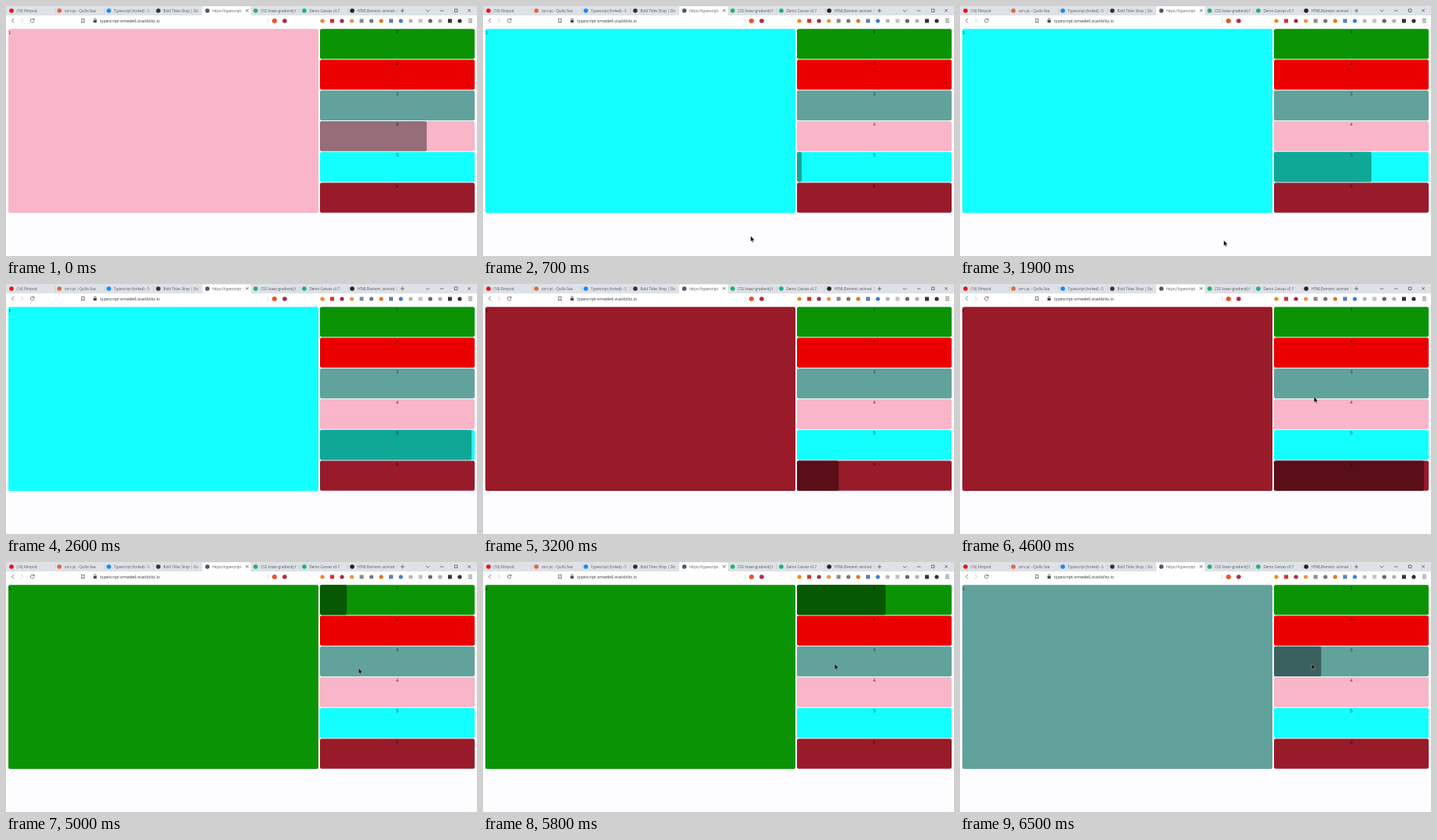
Animation of 600 by 319 pixels, one loop 6.6 s. Source, as an HTML page:

```html
<!DOCTYPE html>
<html lang="en">
<head>
<meta charset="utf-8">
<title>Carousel in a browser</title>
<style>
html, body { margin: 0; width: 100%; height: 100%; overflow: hidden; background: #fdfcfe; }
svg { display: block; width: 100%; height: 100%; }
text { font: 4.5px "Open Sans", "Noto Sans", sans-serif; fill: #55585c; }
.url { font-size: 5.2px; fill: #333; }
.num { font: 6.25px "Liberation Serif", serif; fill: #000; fill-opacity: .8; }
.line { fill: none; stroke: #444; stroke-width: .7; }
.thin { stroke: #b4b7bc; stroke-width: .5; }
</style>
</head>
<body>
<svg id="stage" viewBox="0 0 600 319">
  <rect width="600" height="12" fill="#dee1e6"/>
  <rect y="12" width="600" height="13" fill="#fff"/>
  <path d="M250 12V2q0-1.500 1.500-1.500h59q1.500 0 1.500 1.500V12Z" fill="#fff"/>
  <path class="thin" d="M63 3v6M126 3v6M188 3v6M374 3v6M436 3v6M498 3v6M334 16v6"/>
  <path class="line" d="M305.500 4l3.500 3.500m0-3.500l-3.500 3.500M505 3.500v5M502.500 6h5M535 5l2.300 2.300L539.600 5M553 6h4.500M571.500 4h3.500v3.500h-3.500ZM588.300 4l3.600 3.600m0-3.600l-3.600 3.600"/>
  <path class="line" d="M10 16l-2.700 2.700 2.700 2.700M35.700 17.300a2.400 2.400 0 1 0 .3 2M36 16v1.800h-1.800M96.300 16.300h3.400v5l-1.700-1.500-1.700 1.500ZM589 16.700h5M589 18.800h5M589 20.900h5"/>
  <path class="line" d="M19 16l2.700 2.700-2.700 2.700" opacity=".35"/>
  <path class="line" d="M112.300 18v-1a1.200 1.200 0 0 1 2.400 0v1"/>
  <rect x="111.500" y="18" width="4" height="3.200" fill="#444"/>
  <text class="url" x="120" y="20.600">typescript-xmwde6.stackblitz.io</text>
  <rect id="main" x="3" y="29.200" width="395" height="234.800" rx="2"/>
  <text class="num" x="3.200" y="35.500">1</text>
  <g id="cards"></g>
  <rect id="bar" x="400" height="38.300" rx="2"/>
  <path id="cursor" d="M0 0V7.200L1.700 5.700 2.900 8.200 3.900 7.700 2.800 5.300H5Z" fill="#111" stroke="#fff" stroke-width=".3"/>
</svg>
<script>
const LOOP = 6600, STEP = 100, SLIDE = 2000, WIDTH = 197;
const $ = id => document.getElementById(id);

function add(parent, tag, attrs, text = '') {
  const el = document.createElementNS('http://www.w3.org/2000/svg', tag);
  set(el, attrs);
  el.textContent = text;
  return parent.appendChild(el);
}
function set(el, attrs) {
  for (const key in attrs) el.setAttribute(key, attrs[key]);
}

// Tabs: icon x, icon colour, title
const tabs = [
  [7, '#e8131b', '(16) Filmpod'],
  [68, '#e0683c', 'zorv pc - Quillo Sea'],
  [131, '#1389fd', 'Typescript (forked) - S'],
  [194, '#333', 'Bold Titles Shop | Do'],
  [256.5, '#55585c', 'https://typescript-'],
  [318, '#1fb078', 'CSS linear-gradient() f'],
  [380, '#1fb078', 'Demo Canvas v3.7'],
  [441, '#222', 'HTMLElement: animati']
];
for (const [x, fill, title] of tabs) {
  add($('stage'), 'circle', { cx: x, cy: 6, r: 2.8, fill });
  add($('stage'), 'text', { x: x + 6.5, y: 7.6 }, title);
}

// Toolbar buttons
const icons = ['#ee8a1d', '#d8302c', '#a52a4c', '#e79845', '#8a8a8a', '#777', '#e2761b', '#5c7fb5',
  '#3f7cd0', '#b5b5b5', '#c2c2c2', '#666', '#b0b0b0', '#333', '#333'];
icons.forEach((fill, i) => {
  const x = 403 + i * 12.5;
  if (i % 3 == 1) add($('stage'), 'rect', { x: x - 2.5, y: 16.5, width: 5, height: 5, fill });
  else add($('stage'), 'circle', { cx: x, cy: 19, r: 2.6, fill });
});
add($('stage'), 'circle', { cx: 342, cy: 19, r: 3, fill: '#f0512b' });
add($('stage'), 'circle', { cx: 355, cy: 19, r: 2.8, fill: '#b32a48' });

// Cards: colour, colour under the progress bar
const cards = [
  ['#0a9405', '#065803'], ['#eb0000', '#8d0000'], ['#62a29c', '#3b615e'],
  ['#f8b6c8', '#946d78'], ['#14ffff', '#0fa796'], ['#991b2a', '#5a0f18']
];
const cardY = i => 29.2 + i * 39.25;
const cardText = (i, parent) =>
  add(parent, 'text', { class: 'num', x: 498.3, y: cardY(i) + 6.2, 'text-anchor': 'middle' }, i + 1);
cards.forEach(([fill], i) =>
  add($('cards'), 'rect', { x: 400, y: cardY(i), width: WIDTH, height: 38.3, rx: 2, fill }));
const labels = add($('stage'), 'g', {});
cards.forEach((_, i) => cardText(i, labels));
$('stage').append($('cursor'));

// Slides: start time, card; the last one is picked by a click
const slides = [[-1380, 3], [640, 4], [2660, 5], [4653, 0], [5890, 2]];

// Pointer path: time, x, y; a gap in the list hides the pointer
const paths = [
  [[600, 342, 290], [700, 341, 293.5], [1000, 338, 300], [1400, 336, 299], [2500, 336, 299]],
  [[3300, 385, 299], [3500, 430, 215], [4200, 451, 144], [4700, 451, 144], [5200, 448, 130], [LOOP, 448, 130]]
];
function pointer(t) {
  const path = paths.find(p => t >= p[0][0] && t <= p.at(-1)[0]);
  if (!path) return null;
  const i = Math.max(1, path.findIndex(p => p[0] >= t));
  const [t0, x0, y0] = path[i - 1], [t1, x1, y1] = path[i];
  const k = (t - t0) / (t1 - t0);
  return [x0 + (x1 - x0) * k, y0 + (y1 - y0) * k];
}

function draw(now) {
  const t = Math.floor(now % LOOP / STEP) * STEP;
  const [start, card] = slides.findLast(s => s[0] <= t);
  set($('main'), { fill: cards[card][0] });
  set($('bar'), {
    y: cardY(card),
    width: WIDTH * Math.min(1, (t - start) / SLIDE),
    fill: cards[card][1]
  });
  const pos = pointer(t);
  set($('cursor'), { visibility: pos ? 'visible' : 'hidden', transform: `translate(${pos || '0,0'})` });
}

const begin = performance.now();
function tick() {
  draw(performance.now() - begin);
  requestAnimationFrame(tick);
}
tick();
</script>
</body>
</html>
```
